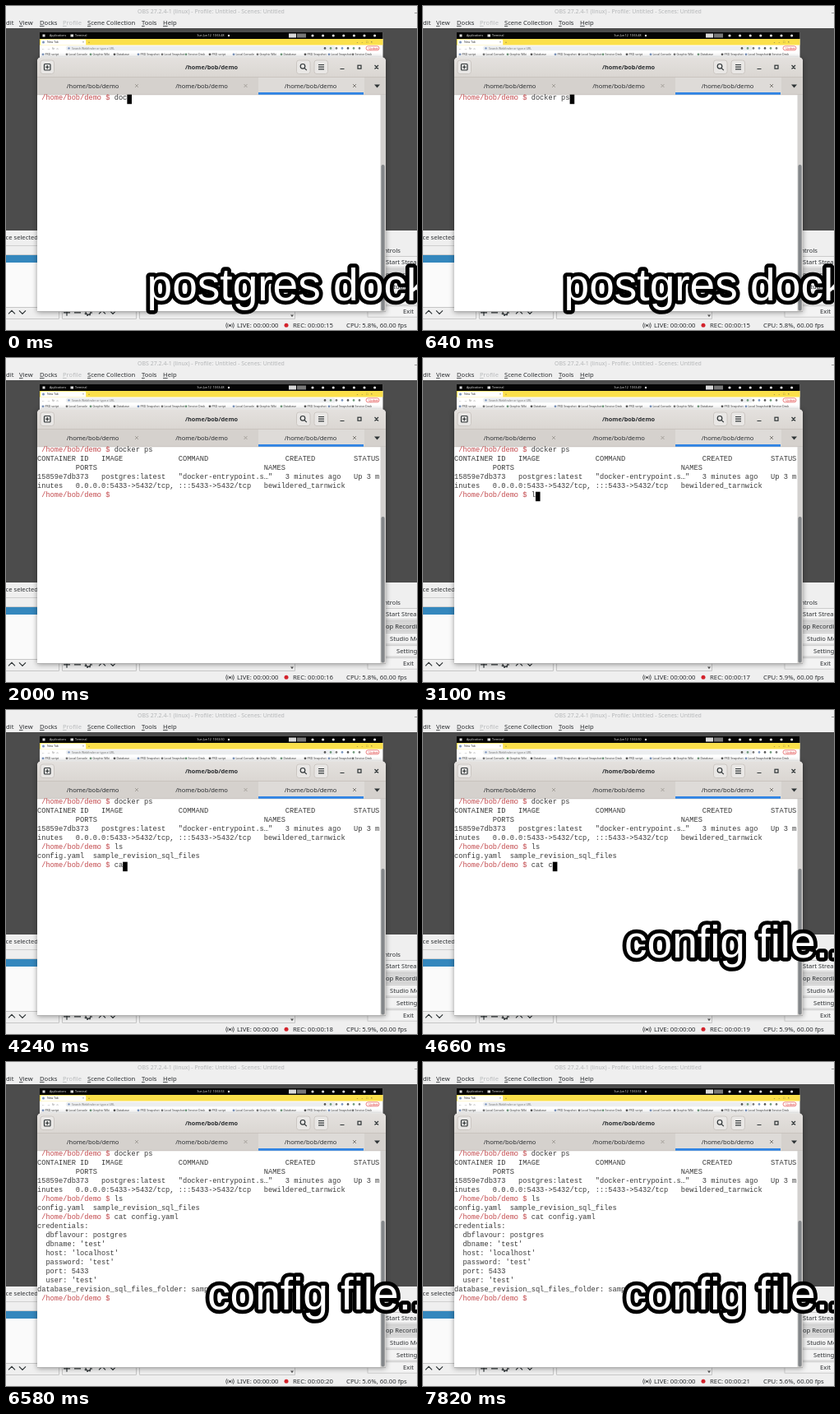
An HTML page for the animation above (8 s loop, 500 by 394 pixels).

```html
<!DOCTYPE html>
<html lang="en">
<head>
<meta charset="utf-8">
<title>Terminal demo</title>
<style>
  html, body { margin: 0; width: 100%; height: 100%; overflow: hidden; background: #efefef; }
  svg { display: block; width: 500px; height: 394px; }
  text { white-space: pre; }
  .ui { font: 7.6px "Noto Sans", "Open Sans", sans-serif; fill: #2b2e31; }
  .status { font-size: 7.75px; }
  .u { text-decoration: underline; text-decoration-thickness: .5px; }
  .tiny { font: 3.5px "Noto Sans", sans-serif; }
  .term { font: 8.68px "Liberation Mono", "DejaVu Sans Mono", monospace; fill: #3a3a3a; }
  .prompt { fill: #c2484c; }
  .caption { font: 55.1px "Liberation Sans", Arial, sans-serif; fill: #fff; stroke: #000;
             stroke-width: 9.5px; stroke-linejoin: round; paint-order: stroke; }
  .line { fill: none; stroke: #2e3436; stroke-width: 1.2; }
  .mid { text-anchor: middle; }
  .shadow { filter: drop-shadow(0 1.5px 3px rgba(0, 0, 0, .4)); }
</style>
</head>
<body>
<svg viewBox="0 0 500 394">
  <defs>
    <linearGradient id="bar" x1="0" y1="0" x2="0" y2="1">
      <stop offset="0" stop-color="#e4e1de"/><stop offset="1" stop-color="#dad6d2"/>
    </linearGradient>
  </defs>

  <!-- recorder window -->
  <rect width="500" height="394" fill="#efefef"/>
  <text class="ui mid" x="249.500" y="9" style="font-size:6.98px;fill:#b4b6b8">OBS 27.2.4-1 (linux) - Profile: Untitled - Scenes: Untitled</text>
  <path d="M497 8.500h3" stroke="#999"/>
  <text class="ui" x="-4.2" y="23">Edit</text>
  <g id="menu"></g>
  <rect y="27" width="500" height="246" fill="#4c4c4c"/>

  <!-- captured desktop -->
  <g id="desktop">
    <rect x="41" y="32" width="417.500" height="31" fill="#fff"/>
    <rect x="41" y="32" width="417.500" height="8" fill="#050505"/>
    <rect x="41" y="40" width="417.500" height="7.500" fill="#fbe04b"/>
    <path d="M42 47.500V42q0-1.200 1.200-1.200H96q1.200 0 1.200 1.200v5.500z" fill="#fff"/>
    <g class="tiny" fill="#ddd">
      <rect x="44.500" y="34.500" width="3" height="3"/>
      <text x="53" y="37.300">Applications</text>
      <rect x="78.500" y="34.500" width="3.500" height="3"/>
      <text x="84" y="37.300">Terminal</text>
      <text id="clock" class="mid" x="249" y="37.300"></text>
      <circle cx="271" cy="36" r="1.200"/>
      <rect x="344" y="33.500" width="9" height="5" fill="#d8d8d8"/>
      <rect x="354" y="33.500" width="11" height="5" fill="#777"/>
    </g>
    <g class="tiny" fill="#444">
      <circle cx="45.500" cy="44" r="1.500" fill="#7b94bd"/>
      <text x="50" y="45.300">New Tab</text>
      <text x="93" y="45.300">×</text>
      <text x="100" y="45.300">+</text>
      <text x="426" y="45.300">⌄    –    □    ×</text>
      <text x="43.500" y="52.700">←   →   ↻   ⌂</text>
      <rect x="73" y="48.600" width="328" height="5.600" rx="2.800" fill="#eceef0"/>
      <circle cx="76.500" cy="51.400" r="1.200" fill="#7b94bd"/>
      <text x="80" y="52.700" fill="#777">Search Webfinder or type a URL</text>
      <rect x="438" y="48.800" width="16" height="5" rx="2.500" fill="#fff" stroke="#d33" stroke-width=".6"/>
      <text x="441" y="52.500" fill="#d33">Update</text>
      <g id="marks"></g>
    </g>
  </g>

  <!-- docks -->
  <text class="ui" x="39" y="284" text-anchor="end">No source selected</text>
  <path d="M0 291.500H39M0 302.500H39" stroke="#cfcfcf"/>
  <rect y="303" width="39" height="63" fill="#fafafa"/>
  <rect y="303" width="39" height="9" fill="#3487bd"/>
  <path d="M0 366.500H39M0 380.500H64.500V366M68.500 366V380.500H158.500V366M162.500 366V380.500H351.500V366" fill="none" stroke="#c6c6c6"/>
  <g class="line" transform="translate(0 -.7)">
    <path d="M3 375l4-4 4 4M16 371l4 4 4-4M70 373.500h8M74 369v8.500M83 373.500h8M113 375l4-4 4 4M126 371l4 4 4-4"/>
    <circle cx="100" cy="373" r="3"/>
    <circle cx="100" cy="373" r="4.200" stroke-dasharray="1.600 1.700"/>
  </g>
  <path d="M346 375.500h4l-2 2.800z" fill="#555"/>
  <text class="ui" x="480" y="299.600" text-anchor="end">Controls</text>
  <g id="controls"></g>

  <!-- status bar -->
  <g fill="none" stroke="#3b3e40" stroke-width=".8">
    <circle cx="272.500" cy="388.500" r="1" fill="#3b3e40"/>
    <path d="M270.300 386.300q-1.600 2.200 0 4.400M274.700 386.300q1.600 2.200 0 4.400M268.700 385.200q-2.300 3.300 0 6.600M276.300 385.200q2.300 3.300 0 6.600"/>
  </g>
  <circle cx="341" cy="388.300" r="2.500" fill="#d3222b"/>
  <text class="ui status" x="281" y="391">LIVE: 00:00:00</text>
  <text class="ui status" id="rec" x="349" y="391"></text>
  <text class="ui status" id="cpu" x="414" y="391"></text>

  <!-- terminal window -->
  <g class="shadow">
    <path d="M38 371.500V67.500q0-5 5-5H457q5 0 5 5V371.500z" fill="#fff"/>
    <path d="M38 87V67.500q0-5 5-5H457q5 0 5 5V87z" fill="url(#bar)"/>
  </g>
  <rect x="38" y="86.500" width="424" height="21.500" fill="#d5d1cd"/>
  <rect x="307" y="86.500" width="129" height="21.500" fill="#dedbd8"/>
  <path d="M38 86.500H462M38 107.800H462" stroke="#c3bdb8" stroke-width=".7"/>
  <rect x="307" y="105" width="128" height="2.800" fill="#3084e4"/>
  <g fill="#e9e7e5" stroke="#c5bfba" stroke-width=".8">
    <rect x="42" y="66" width="16.500" height="16.500" rx="3"/>
    <rect x="353.500" y="66" width="16.500" height="16.500" rx="3"/>
    <rect x="375" y="66" width="16.500" height="16.500" rx="3"/>
  </g>
  <g class="line">
    <rect x="46.500" y="70.500" width="7.500" height="7.500" rx="1"/>
    <path d="M48 74.250h4.500M50.250 72v4.500"/>
    <circle cx="361" cy="73.300" r="2.800"/>
    <path d="M363 75.300l2.800 2.800M380 71.500h7M380 74.200h7M380 76.900h7"/>
    <path d="M406.500 76.500h5M448.500 72l4.500 4.500M453 72l-4.500 4.500"/>
    <rect x="428" y="72.200" width="4" height="4"/>
  </g>
  <path d="M448 95.500h7l-3.500 4z" fill="#2e3436"/>
  <text class="ui mid" x="250" y="76.800" style="font-size:7.3px;font-weight:700">/home/bob/demo</text>
  <g id="tabs"></g>
  <rect x="455.500" y="108" width="6.500" height="263.500" fill="#d3d1cf"/>
  <rect x="456.400" y="193" width="4.300" height="177.500" rx="2" fill="#84878a"/>
  <path d="M38 371.500H462" stroke="#a9a9a9" stroke-width=".8"/>

  <g id="screen"></g>
  <rect id="cursor" width="5.600" height="11.500" fill="#000"/>
  <text class="caption" id="caption"></text>
</svg>

<script>
const LOOP = 8000, LEFT = 38, COL = 5.208, TOP = 113.9, ROW = 11;
const $ = id => document.getElementById(id);

function add(parent, tag, attrs, text = '') {
  const el = document.createElementNS('http://www.w3.org/2000/svg', tag);
  for (const key in attrs) el.setAttribute(key, attrs[key]);
  el.textContent = text;
  parent.appendChild(el);
  return el;
}

// static repeats
[['View', 16], ['Docks', 41], ['Profile', 69], ['Scene Collection', 99], ['Tools', 165], ['Help', 191]]
  .forEach(([word, x]) => {
    const el = add($('menu'), 'text', { x, y: 23, class: 'ui' });
    if (word === 'Profile') el.style.fill = '#b9bbbd';
    add(el, 'tspan', { class: 'u' }, word[0]);
    add(el, 'tspan', {}, word.slice(1));
  });

['Start Streaming', 'op Recording', 'Studio Mode', 'Settings', 'Exit'].forEach((label, i) => {
  const y = 304.4 + i * 15.1;
  add($('controls'), 'rect', { x: 440, y, width: 70, height: 13.4,
    fill: i === 1 ? '#d6d6d6' : '#f3f3f3', stroke: '#c4c4c4', 'stroke-width': .8 });
  add($('controls'), 'text', { x: [462, 462, 467, 475, 483][i], y: y + 9.2, class: 'ui' }, label);
});

[105.5, 238, 370.5].forEach((x, i) => {
  add($('tabs'), 'text', { x, y: 99.8, class: 'ui mid' }, '/home/bob/demo');
  add($('tabs'), 'path', { d: `M${x + 51.5} 95l4 4m0-4l-4 4`, stroke: i === 2 ? '#77736f' : '#a09b96', 'stroke-width': .9 });
});

const labels = ['PRD script', 'Local Console', 'Graphic Wiki', 'Database', 'PRD Snapshot', 'Local Snapshot', 'Service Desk'];
const tints = ['#7b94bd', '#555', '#6f9a7b', '#777'];
for (let i = 0; i < 14; i++) {
  const x = 45 + i * 29;
  add($('marks'), 'circle', { cx: x, cy: 58.8, r: 1.4, fill: tints[i * 3 % 4] });
  add($('marks'), 'text', { x: x + 2.5, y: 60 }, labels[i % 7]);
}
for (let i = 0; i < 7; i++) {
  add($('desktop'), 'circle', { cx: 373 + i * 12.6, cy: 36, r: 1.6, fill: '#ddd' });
  add($('desktop'), 'circle', { cx: 388 + i * 7, cy: 51.4, r: 1.3, fill: tints[(i + 1) % 4] });
}

// terminal session: [start row, time shown, lines]
const PROMPT = ' /home/bob/demo $ ';
const outputs = [
  [1, 880, [
    'CONTAINER ID   IMAGE             COMMAND                  CREATED         STATUS',
    '         PORTS                                       NAMES',
    '15859e7db373   postgres:latest   "docker-entrypoint.s…"   3 minutes ago   Up 3 m',
    'inutes   0.0.0.0:5433->5432/tcp, :::5433->5432/tcp   bewildered_tarnwick']],
  [6, 3440, ['config.yaml  sample_revision_sql_files']],
  [8, 5690, [
    'credentials:', '  dbflavour: postgres', "  dbname: 'test'", "  host: 'localhost'",
    "  password: 'test'", '  port: 5433', "  user: 'test'",
    'database_revision_sql_files_folder: sample_revision_sql_files']]
];
// [row, time shown, time entered, full command, [time, letters typed]...]
const inputs = [
  [0, 0, 780, 'docker ps', [0, 3], [70, 4], [160, 5], [260, 6], [350, 7], [495, 8], [635, 9]],
  [5, 880, 3380, 'ls', [3055, 1], [3195, 2]],
  [7, 3460, 5675, 'cat config.yaml ', [4010, 1], [4230, 2], [4295, 3], [4475, 4], [4650, 5],
    [4795, 6], [4890, 7], [4975, 8], [5255, 16]],
  [16, 5690, LOOP, '']
];
const blinkOff = [[1570, 2250], [2890, 3055], [6330, 7070], [7810, LOOP]];
const recTimes = [[0, 15], [820, 16], [2050, 17], [3250, 18], [4510, 19], [5780, 20], [6910, 21]];
const cpuTimes = [[0, '5.8'], [2680, '5.9'], [6340, '5.6']];
const clockTimes = [[0, 48], [2050, 49], [3200, 50], [5110, 52], [6540, 53]];
const captions = [[0, 'postgres docker', 171.5, 358.2], [2000, '', 0, 0], [4295, 'config file...', 245, 300.7]];

const at = (steps, t) => steps.reduce((value, step) => step[0] <= t ? step : value, [0, 0]);

const screen = $('screen');
const putLine = (row, text) =>
  add(screen, 'text', { x: LEFT, y: TOP + row * ROW, class: 'term', 'xml:space': 'preserve' }, text);

const blocks = outputs.map(([row, from, lines]) => ({ from, els: lines.map((line, i) => putLine(row + i, line)) }));
const prompts = inputs.map(([row]) => {
  const el = putLine(row, '');
  add(el, 'tspan', { class: 'prompt' }, PROMPT);
  return { el, typed: add(el, 'tspan', {}) };
});

function setText(el, text) {
  if (el.textContent !== text) el.textContent = text;
}

function draw(t) {
  for (const { from, els } of blocks)
    for (const el of els) el.style.display = t >= from ? '' : 'none';

  let row = 0, col = 0;
  inputs.forEach(([line, from, entered, command, ...steps], i) => {
    const count = at(steps, t)[1];
    prompts[i].el.style.display = t >= from ? '' : 'none';
    setText(prompts[i].typed, command.slice(0, count));
    if (t >= from) [row, col] = t < entered ? [line, PROMPT.length + count] : [line + 1, 0];
  });
  const cursor = $('cursor');
  cursor.setAttribute('x', LEFT + col * COL);
  cursor.setAttribute('y', 107.7 + row * ROW);
  cursor.style.display = blinkOff.some(([a, b]) => t >= a && t < b) ? 'none' : '';

  setText($('rec'), 'REC: 00:00:' + at(recTimes, t)[1]);
  setText($('cpu'), `CPU: ${at(cpuTimes, t)[1]}%, 60.00 fps`);
  setText($('clock'), 'Sun Jun 12  10:53:' + at(clockTimes, t)[1]);

  const [, words, x, y] = at(captions, t);
  setText($('caption'), words);
  $('caption').setAttribute('x', x);
  $('caption').setAttribute('y', y);
}

const start = performance.now();
function tick() {
  draw((performance.now() - start) % LOOP);
  requestAnimationFrame(tick);
}
tick();
</script>
</body>
</html>
```
